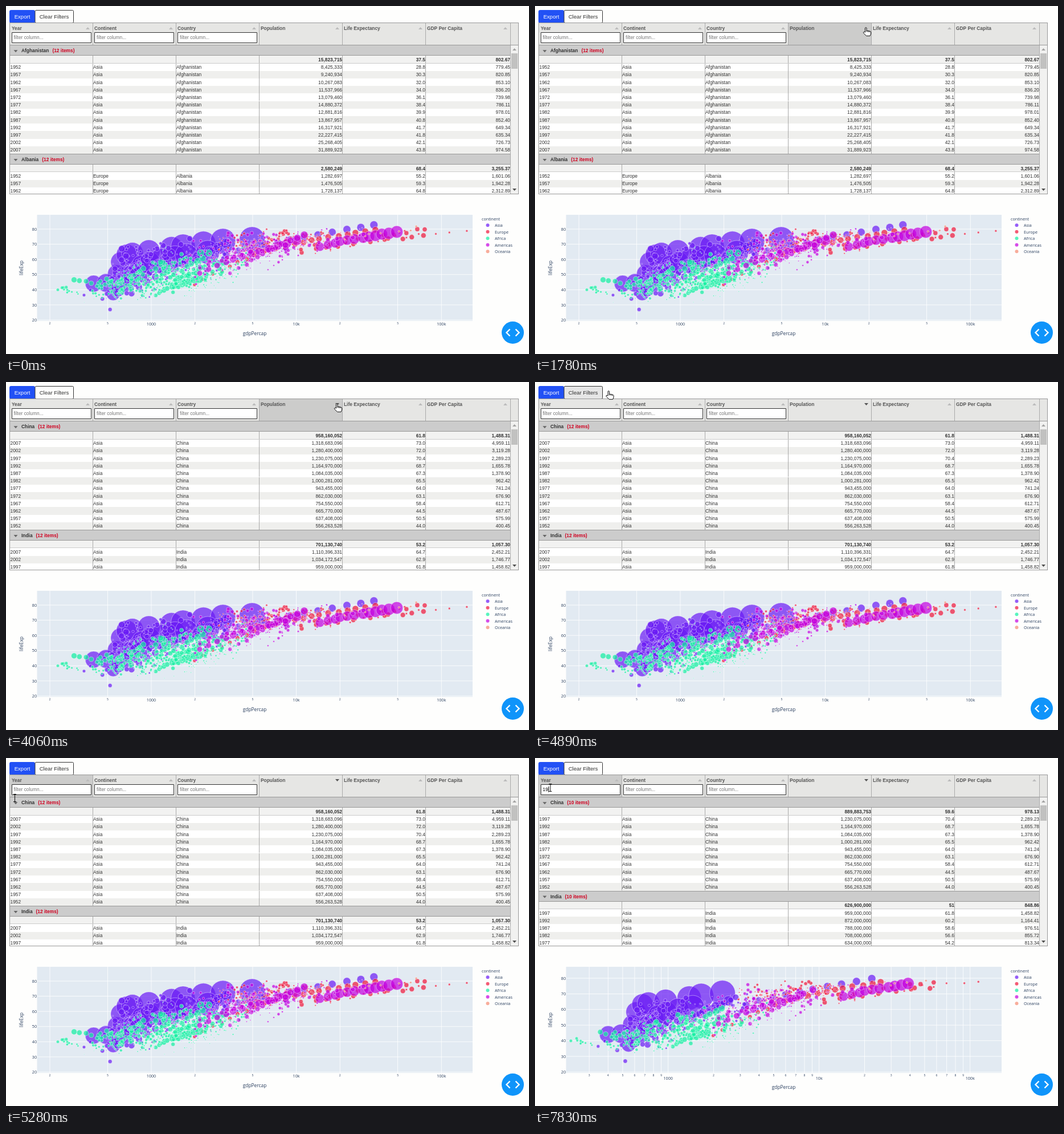
Write an HTML page with a canvas that moves like this. It is 918 px wide and 610 px high and loops after 8 s.

```html
<!DOCTYPE html>
<html lang="en">
<head>
<meta charset="utf-8">
<title>Country table and bubble chart</title>
<style>
  html, body { margin: 0; width: 100%; height: 100%; overflow: hidden; background: #fefefd; }
  canvas { display: block; }
</style>
</head>
<body>
<canvas id="stage" width="918" height="610"></canvas>
<script>
const WIDTH = 918, HEIGHT = 610, LOOP = 8000;
const SANS = '"Liberation Sans", Arial, sans-serif';
const CHART_FONT = '"Open Sans", sans-serif';
const stage = document.getElementById('stage').getContext('2d');
let ctx = stage;

// ---- drawing helpers ----
function rect(x, y, w, h, color) {
  ctx.fillStyle = color;
  ctx.fillRect(x, y, w, h);
}
function box(x, y, w, h, fill, stroke, radius = 0) {
  ctx.beginPath();
  ctx.roundRect(x, y, w, h, radius);
  ctx.fillStyle = fill;
  ctx.fill();
  ctx.strokeStyle = stroke;
  ctx.lineWidth = 1;
  ctx.stroke();
}
function text(str, x, y, { size = 8.4, color = '#333', align = 'left', bold = false, font = SANS } = {}) {
  ctx.font = `${bold ? 'bold ' : ''}${size}px ${font}`;
  ctx.fillStyle = color;
  ctx.textAlign = align;
  ctx.fillText(str, x, y);
  return ctx.measureText(str).width;
}
function triangle(cx, cy, w, h, up, color) {
  const tip = up ? -h / 2 : h / 2;
  ctx.beginPath();
  ctx.moveTo(cx - w / 2, cy - tip);
  ctx.lineTo(cx + w / 2, cy - tip);
  ctx.lineTo(cx, cy + tip);
  ctx.fillStyle = color;
  ctx.fill();
}
function disc(x, y, r, color) {
  ctx.beginPath();
  ctx.arc(x, y, r, 0, 7);
  ctx.fillStyle = color;
  ctx.fill();
}

// ---- table data: population, life expectancy, GDP per capita, every five years from 1952 ----
function country(name, continent, values, mean) {
  const rows = [];
  for (let i = 0; i < values.length; i += 3)
    rows.push({ year: 1952 + rows.length * 5, values: values.slice(i, i + 3) });
  return { name, continent, rows, mean };
}
const afghanistan = country('Afghanistan', 'Asia', [
  8425333, 28.8, 779.45, 9240934, 30.3, 820.85, 10267083, 32, 853.10, 11537966, 34, 836.20,
  13079460, 36.1, 739.98, 14880372, 38.4, 786.11, 12881816, 39.9, 978.01, 13867957, 40.8, 852.40,
  16317921, 41.7, 649.34, 22227415, 41.8, 635.34, 25268405, 42.1, 726.73, 31889923, 43.8, 974.58]);
const albania = country('Albania', 'Europe', [
  1282697, 55.2, 1601.06, 1476505, 59.3, 1942.28, 1728137, 64.8, 2312.89], [2580249, 68.4, 3255.37]);
const saoTome = country('Sao Tome and Principe', 'Africa', [
  60011, 46.5, 879.58, 61325, 48.9, 860.74, 65345, 51.9, 1071.55, 70787, 54.4, 1384.84,
  76595, 56.5, 1532.99, 86796, 58.6, 1737.56, 98593, 60.4, 1890.22, 110812, 61.7, 1516.53,
  125911, 62.7, 1428.78, 145608, 63.3, 1339.08, 170372, 64.3, 1353.09, 199579, 65.5, 1598.44]);
const djibouti = country('Djibouti', 'Africa', [
  63149, 34.8, 2669.53, 71851, 37.3, 2864.97, 89898, 39.7, 3020.99], [260244, 46.4, 2697.83]);
const china = country('China', 'Asia', [
  556263528, 44, 400.45, 637408000, 50.5, 575.99, 665770000, 44.5, 487.67, 754550000, 58.4, 612.71,
  862030000, 63.1, 676.90, 943455000, 64, 741.24, 1000281000, 65.5, 962.42, 1084035000, 67.3, 1378.90,
  1164970000, 68.7, 1655.78, 1230075000, 70.4, 2289.23, 1280400000, 72, 3119.28, 1318683096, 73, 4959.11]);
const india = country('India', 'Asia', [
  372e6, 37.373, 546.57, 409e6, 40.249, 590.06, 454e6, 43.605, 658.35, 506e6, 47.193, 700.77,
  567e6, 50.651, 724.03, 634e6, 54.208, 813.34, 708e6, 56.596, 855.72, 788e6, 58.553, 976.51,
  872e6, 60.223, 1164.41, 959e6, 61.765, 1458.82, 1034172547, 62.879, 1746.77, 1110396331, 64.698, 2452.21]);

// ---- chart data ----
let seed = 11;
function random() {
  seed = (seed * 1664525 + 1013904223) % 4294967296;
  return seed / 4294967296;
}
const gauss = () => (random() + random() + random() - 1.5) * 2;

// log GDP (mean, spread, growth), life at start and end (mean, spread), population growth
const regions = [
  { name: 'Asia', color: '#6a1af5', count: 27, gdp: [3.12, .33, .5], life: [47, 7, 70, 5], growth: 2.6 },
  { name: 'Europe', color: '#f0163a', count: 28, gdp: [3.75, .2, .55], life: [65, 4, 77, 2.5], growth: 1.3 },
  { name: 'Africa', color: '#12f0a2', count: 49, gdp: [2.98, .22, .17], life: [39, 4, 54, 7], growth: 3.2 },
  { name: 'Americas', color: '#c400e0', count: 22, gdp: [3.47, .2, .36], life: [53, 7, 73, 3.5], growth: 2.5 },
  { name: 'Oceania', color: '#f58a70', count: 2, gdp: [4.01, .01, .46], life: [69, .3, 80.7, .5], growth: 2.2 },
];
// GDP and life in 1952, GDP and life in 2007, population in millions at both ends
const largeCountries = {
  Asia: [[750, 37.5, 3541, 70.7, 82, 223], [685, 43.4, 2606, 65.5, 41, 169], [684, 37.5, 1391, 64, 47, 150],
    [3217, 63, 31656, 82.6, 86, 127], [1273, 47.8, 3190, 71.7, 22, 91], [331, 36.3, 944, 62, 20, 48]],
  Europe: [[7144, 67.5, 32170, 79.4, 69, 82], [1969, 43.6, 8458, 71.8, 22, 71]],
  Africa: [[1077, 36.3, 2014, 46.9, 33, 135], [781, 39.1, 278, 46.5, 14, 65]],
  Americas: [[13990, 68.4, 42952, 78.2, 157, 301], [2109, 50.9, 9066, 72.4, 57, 190],
    [3478, 50.8, 11978, 76.2, 30, 109]],
  Oceania: [],
};
const mix = (a, b, k) => a + (b - a) * k;
function trend(gdp0, life0, gdp1, life1, pop0, pop1, noise) {
  let drift = 0;
  return Array.from({ length: 12 }, (_, i) => {
    const k = i / 11;
    drift += gauss() * noise * .035;
    return { year: 1952 + i * 5, gdp: mix(gdp0, gdp1, k) + drift, pop: pop0 * (pop1 / pop0) ** k,
             life: mix(life0, life1, k ** .85) + gauss() * noise * .7 };
  });
}
for (const region of regions) {
  region.points = [];
  if (region.name === 'Asia')
    for (const { rows } of [china, india])
      for (const { year, values: [pop, life, gdp] } of rows)
        region.points.push({ year, pop, life, gdp: Math.log10(gdp) });
  for (const [g0, l0, g1, l1, p0, p1] of largeCountries[region.name])
    region.points.push(...trend(Math.log10(g0), l0, Math.log10(g1), l1, p0 * 1e6, p1 * 1e6, .25));
  const [gdp, gdpSpread, rise] = region.gdp, [life0, spread0, life1, spread1] = region.life;
  for (let i = 0; i < region.count; i++) {
    const wealth = gauss(), start = gdp + gdpSpread * wealth, pop = 10 ** (6.6 + .42 * gauss());
    region.points.push(...trend(start, life0 + spread0 * (.6 * wealth + .7 * gauss()),
      start + rise * (1 + .5 * gauss()), life1 + spread1 * (.6 * wealth + .7 * gauss()), pop, pop * region.growth, 1));
  }
}

function drawChart(filtered) {
  const axis = filtered
    ? { thousand: 233.7, decade: 265, eighty: 386, unit: 2.74, steps: [1, 2, 3, 4, 5, 6, 7, 8, 9], major: 563.5, title: 580 }
    : { thousand: 255, decade: 254.6, eighty: 391, unit: 2.658, steps: [1, 2, 5], major: 559.5, title: 577 };
  const px = logGdp => axis.thousand + (logGdp - 3) * axis.decade;
  const py = life => axis.eighty + (80 - life) * axis.unit;
  const label = { size: 7.2, color: '#2a3f5f', font: CHART_FONT };
  const left = 54.5, top = 366, width = 764.5, height = 186;

  rect(left, top, width, height, '#e2eaf2');
  for (let power = 2; power <= 5; power++)
    for (const step of axis.steps) {
      const x = px(power + Math.log10(step));
      if (x < left || x > left + width) continue;
      rect(x - .4, top, .8, height, '#fff');
      if (step === 1) text({ 3: '1000', 4: '10k', 5: '100k' }[power], x, axis.major, { ...label, align: 'center' });
      else text(step, x, 558, { ...label, size: 5, align: 'center' });
    }
  for (let life = 20; life <= 80; life += 10) {
    rect(left, py(life) - .4, width, .8, '#fff');
    text(life, 54, py(life) + 2.6, { ...label, align: 'right' });
  }
  text('gdpPercap', 436.5, axis.title, { ...label, size: 8.4, align: 'center' });
  ctx.save();
  ctx.translate(30, 459);
  ctx.rotate(-Math.PI / 2);
  text('lifeExp', 0, 0, { ...label, size: 8.4, align: 'center' });
  ctx.restore();

  const largest = filtered ? 1230075000 : 1318683096;
  ctx.save();
  ctx.beginPath();
  ctx.rect(left, top, width, height);
  ctx.clip();
  ctx.strokeStyle = '#fff';
  ctx.lineWidth = .6;
  ctx.globalAlpha = .7;
  for (const { points, color } of regions)
    for (const p of points)
      if (!filtered || p.year < 2000) {
        disc(px(p.gdp), py(p.life), 22.5 * Math.sqrt(p.pop / largest), color);
        ctx.stroke();
      }
  ctx.restore();

  text('continent', 835, 375.5, label);
  regions.forEach(({ name, color }, i) => {
    const y = 384.3 + i * 11.5;
    ctx.globalAlpha = .7;
    disc(845.5, y, 3, color);
    ctx.globalAlpha = 1;
    text(name, 858, y + 2.7, label);
  });
}
function prerender(filtered) {
  const canvas = document.createElement('canvas');
  canvas.width = WIDTH;
  canvas.height = HEIGHT;
  ctx = canvas.getContext('2d');
  drawChart(filtered);
  ctx = stage;
  return canvas;
}
const fullChart = prerender(false), filteredChart = prerender(true);

// ---- table ----
const edges = [7, 152, 298, 444, 590, 736, 885];
const titles = ['Year', 'Continent', 'Country', 'Population', 'Life Expectancy', 'GDP Per Capita'];
const fixed = (n, digits) => n.toLocaleString('en-US', { minimumFractionDigits: digits, maximumFractionDigits: digits });

function drawRow(y, cells, background, bold) {
  const top = Math.round(y);
  rect(7, top, 878, Math.round(y + 13.2) - top, background);
  for (const x of edges.slice(1, 6)) rect(x, top, 1, 13.2, '#aaa');
  cells.forEach((cell, i) => i < 3
    ? text(cell, edges[i] + (i ? 1 : .5), y + 9.6, { bold })
    : text(cell, edges[i + 1], y + 9.6, { bold, align: 'right' }));
}
function drawGroup(y, { name, continent, rows, mean }, { descending, filtered }, hovered) {
  const shown = rows.filter(row => !filtered || String(row.year).startsWith('19'));
  if (descending) shown.reverse();
  const top = Math.round(y);
  rect(7, top, 878, 19, hovered ? '#e5e5e5' : '#ccc');
  rect(7, top, 878, 1, '#999');
  rect(7, top + 18, 878, 1, '#999');
  triangle(17, y + 11, 7, 4, false, '#666');
  const nameWidth = text(name, 27, y + 13, { bold: true });
  text(`(${filtered ? 10 : 12} items)`, 27 + nameWidth + 6, y + 13, { bold: true, color: '#d00020' });
  y += 19.2;
  const [pop, life, gdp] = mean || [0, 1, 2].map(i => shown.reduce((sum, row) => sum + row.values[i], 0) / shown.length);
  drawRow(y, ['', '', '', fixed(pop, 0), +life.toFixed(1), fixed(gdp, 2)], '#f2f2f1', true);
  y += 13.2;
  rect(7, Math.round(y) - 1, 878, 1, '#ccc');
  shown.forEach(({ year, values }, i) => {
    drawRow(y, [year, continent, name, fixed(values[0], 0), values[1].toFixed(1), fixed(values[2], 2)],
      i % 2 ? '#efefed' : '#fff');
    y += 13.2;
  });
  return y;
}
function drawHeader(view, hover, typed, caret) {
  rect(7, 30, 892, 39, '#e6e6e4');
  titles.forEach((title, i) => {
    const x = edges[i], end = edges[i + 1];
    if (hover === i) rect(x + 1, 30, end - x - 1, 39, '#cccccb');
    rect(end, 30, 1, 39, '#aaa');
    text(title, x + 3, 41.5, { bold: true, color: '#555' });
    const sorted = i === 3 && view.sort;
    triangle(end - 8.5, 39, 7, 4, sorted !== 'desc', sorted ? '#555' : '#bbb');
    if (i > 2) return;
    box(x + 3.5, 46.5, 139, 18, '#fff', '#333');
    if (i === 0 && typed) text(typed, x + 6.5, 58, { color: '#000' });
    else text('filter column...', x + 6.5 + (i ? .5 : 0), 58, { color: '#757575' });
  });
  if (caret) rect(14 + typed.length * 4.7, 50, 1, 10, '#000');
  rect(7, 68, 892, 1, '#999');
}
function drawScrollbar() {
  rect(886, 69, 13, 260, '#f1f1f0');
  rect(887, 83, 11, 27, '#c1c1c0');
  triangle(892.5, 76, 7, 4, true, '#a3a3a3');
  triangle(892.5, 322, 7, 4, false, '#505050');
}
function drawTable(view, hover, typed, caret) {
  ctx.save();
  ctx.beginPath();
  ctx.rect(7, 30, 892, 299);
  ctx.clip();
  rect(7, 69, 892, 260, '#fff');
  let y = 68.2;
  view.groups.forEach((group, i) => { y = drawGroup(y, group, view, hover === 'group' && i === 0); });
  rect(885, 69, 1, 260, '#aaa');
  drawScrollbar();
  drawHeader(view, hover, typed, caret);
  ctx.restore();
  ctx.strokeStyle = '#999';
  ctx.lineWidth = 1;
  ctx.strokeRect(6.5, 29.5, 893, 300);
}

// ---- cursor ----
const handPath = new Path2D('M4 9V2Q4 .6 5.2 .6T6.4 2V6L12.4 7.2Q14 7.6 14 9V12L12.6 15.4H6L1 10.2Q.4 8.6 2 8.3Z');
const handLines = new Path2D('M6.4 6V8.5M9 6.6V8.8M11.5 7.1V9.2');
const beamPath = new Path2D('M-2.5 -6.5H2.5M0 -6.5V6.5M-2.5 6.5H2.5');
const resizePath = new Path2D('M-9 0L-4.5 -4V-1H4.5V-4L9 0L4.5 4V1H-4.5V4Z');
const cursors = {
  hand() {
    ctx.fillStyle = '#fff';
    ctx.fill(handPath);
    ctx.stroke(handPath);
    ctx.stroke(handLines);
  },
  beam() { ctx.stroke(beamPath); },
  resize() {
    ctx.fillStyle = '#222';
    ctx.fill(resizePath);
  },
};
// time, x, y, shape, hovered part (a number is a column)
const pointer = [
  [780, 530, 15, 'hand', null], [840, 542, 19, 'hand', 3], [890, 552, 23, 'hand', 3], [1000, 560, 26, 'hand', 3],
  [1220, 588.5, 39.5, 'resize', 3], [1440, 584, 38, 'hand', 3], [1610, 577, 37.5, 'hand', 3], [1780, 575.5, 37, 'hand', 3],
  [4720, 470, 32, 'hand', 2], [4780, 330, 24, 'hand', null], [4830, 215, 18, 'hand', null], [4890, 124, 15, 'hand', 'clear'],
  [4940, 70, 16, 'hand', 'export'], [5000, 30, 24, 'hand', null], [5060, 6, 36, 'hand', 0], [5110, 1, 50, 'hand', 0],
  [5170, 4, 62, 'hand', 'group'], [5220, 12, 70, 'hand', 'group'], [5280, 15.5, 70, 'beam', 0],
  [5330, 21, 60, 'beam', 0], [5440, 27, 52, 'beam', 0],
];
function drawCursor([, x, y, shape]) {
  ctx.save();
  ctx.translate(x, y);
  ctx.strokeStyle = '#111';
  ctx.lineWidth = 1;
  cursors[shape]();
  ctx.restore();
}

// ---- scene ----
const views = [
  { from: 0, groups: [afghanistan, albania] },
  { from: 2830, groups: [saoTome, djibouti], sort: 'asc' },
  { from: 4060, groups: [china, india], sort: 'desc', descending: true },
  { from: 7830, groups: [china, india], sort: 'desc', descending: true, filtered: true },
];
function drawButtons(hover) {
  box(6.5, 7.5, 44, 22, hover === 'export' ? '#1d46d4' : '#2251f5', '#2251f5', 2);
  text('Export', 28.5, 22, { size: 9.6, color: '#fff', align: 'center' });
  box(51, 7.5, 67.5, 22, hover === 'clear' ? '#e6e6e6' : '#fefefd', '#333', 2);
  text('Clear Filters', 84.5, 22, { size: 9.6, align: 'center' });
}
function drawCodeButton() {
  disc(889.5, 572.5, 19.5, '#0f94fa');
  ctx.beginPath();
  for (const side of [-1, 1]) {
    ctx.moveTo(889.5 + side * 5, 566.5);
    ctx.lineTo(889.5 + side * 11, 572.5);
    ctx.lineTo(889.5 + side * 5, 578.5);
  }
  ctx.strokeStyle = '#fff';
  ctx.lineWidth = 2.4;
  ctx.stroke();
}
function draw(now) {
  const t = now % LOOP;
  const view = views.findLast(v => t >= v.from);
  const cursor = pointer.findLast(([start]) => t >= start);
  const hover = cursor ? cursor[4] : null;
  const typed = t < 7170 ? '' : t < 7500 ? '1' : '19';
  const caret = (t >= 6000 && t < 6440) || t >= 7170;

  rect(0, 0, WIDTH, HEIGHT, '#fefefd');
  drawButtons(hover);
  drawTable(view, hover, typed, caret);
  ctx.drawImage(view.filtered ? filteredChart : fullChart, 0, 0);
  drawCodeButton();
  if (cursor) drawCursor(cursor);
  requestAnimationFrame(draw);
}
requestAnimationFrame(draw);
</script>
</body>
</html>
```
